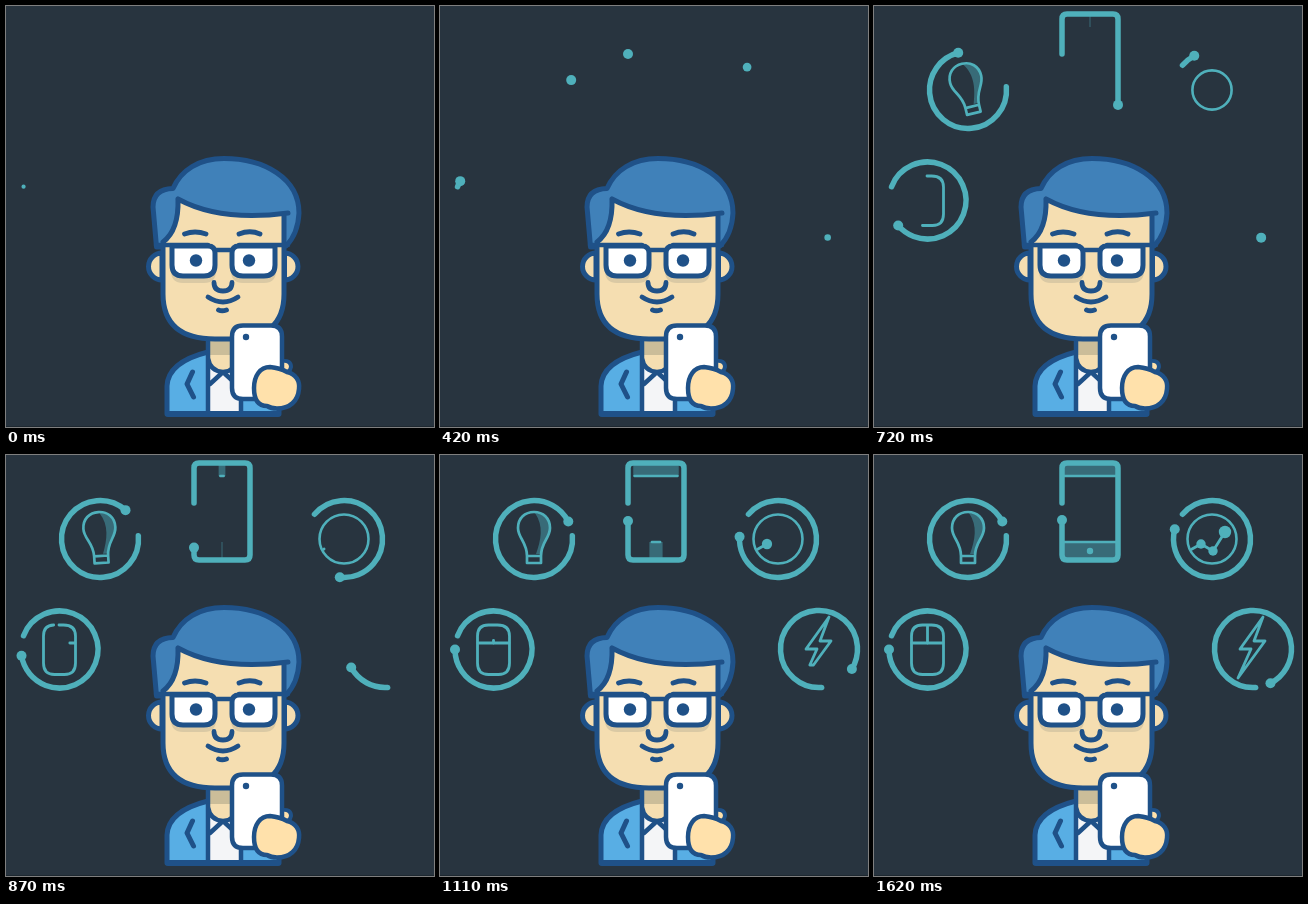
Recreate the animation shown at these times as an HTML page with a canvas. Size 428 px wide and 421 px high, loop 3.62 s.

```html
<!DOCTYPE html>
<html lang="en">
<head>
<meta charset="utf-8">
<title>Gadget icons</title>
<style>
html, body { margin: 0; width: 100%; height: 100%; overflow: hidden; background: #28343f; }
canvas { display: block; }
</style>
</head>
<body>
<canvas width="428" height="421"></canvas>
<script>
const LOOP = 3620, STEP = 30, LAST = 1620;
const TEAL = '#4fb0bb', SHADE = '#386b78', NAVY = '#1f5188', SKIN = '#f5deb1', HAIR = '#4081b9';
const c = document.querySelector('canvas').getContext('2d');
c.lineCap = c.lineJoin = 'round';

// Timing helpers
const part = (t, start, length) => Math.min(1, Math.max(0, (t - start) / length));
const quadOut = p => 1 - (1 - p) ** 2;
const cubicOut = p => 1 - (1 - p) ** 3;
const smooth = p => p * p * (3 - 2 * p);
const backOut = p => p && 1 + 2.7 * (p - 1) ** 3 + 1.7 * (p - 1) ** 2;

// Slow start, quick middle, long settle: cubic-bezier(.5, 0, 0, 1)
function sweep(p) {
  let lo = 0, hi = 1;
  for (let i = 0; i < 20; i++) {
    const s = (lo + hi) / 2;
    if (1.5 * s * (1 - s) ** 2 + s ** 3 < p) lo = s; else hi = s;
  }
  return 3 * lo * lo - 2 * lo ** 3;
}

// Drawing helpers
function shape(d, fill, stroke, width = 5) {
  const path = new Path2D(d);
  if (fill) { c.fillStyle = fill; c.fill(path); }
  if (stroke) { c.strokeStyle = stroke; c.lineWidth = width; c.stroke(path); }
}

function disc(x, y, r, color = TEAL) {
  if (r <= 0) return;
  c.fillStyle = color;
  c.beginPath();
  c.arc(x, y, r, 0, 7);
  c.fill();
}

function makePath(d) {
  const el = document.createElementNS('http://www.w3.org/2000/svg', 'path');
  el.setAttribute('d', d);
  return { d, el, length: el.getTotalLength() };
}

function trace(path, p, width) {
  if (p <= 0) return;
  c.setLineDash(p < 1 ? [path.length * p, path.length * 2] : []);
  shape(path.d, null, TEAL, width);
  c.setLineDash([]);
}

const dotSize = (t, start) => 5 * cubicOut(part(t, start, 300));

// Angles in degrees: dot travels from a to b, the line begins at s
function ring(t, x, y, [s, a, b], pop, start) {
  const rad = Math.PI / 180, r = 38.5;
  const angle = a + (b - a) * sweep(part(t, start, 720));
  if (angle > s) {
    c.beginPath();
    c.arc(x, y, r, s * rad, angle * rad);
    c.strokeStyle = TEAL;
    c.lineWidth = 5.5;
    c.stroke();
  }
  disc(x + r * Math.cos(angle * rad), y + r * Math.sin(angle * rad), dotSize(t, pop));
}

const mouseBody = makePath('M53 170H57.5Q69.5 170 69.5 181V208Q69.5 219.5 58.5 219.5H48.5Q37.5 219.5 37.5 208V181Q37.5 170 48.5 170Z');
const mouseSplit = makePath('M69 188H38');
const mouseButton = makePath('M53.5 188V171');
const phoneFrame = makePath('M188 48V13Q188 8 193 8H239Q244 8 244 13V100Q244 105 239 105H193Q188 105 188 100V65');
const graph = makePath('M318 94L327 89L339 96L351 77');
const bolt = [[389, 162], [366, 194], [377, 194], [364, 223], [391, 186], [380, 186]];

function mouse(t) {
  ring(t, 53.5, 194.5, [201, 201, 540], -50, 333);
  trace(mouseBody, smooth(part(t, 500, 420)), 2.8);
  trace(mouseSplit, smooth(part(t, 800, 270)), 2.8);
  trace(mouseButton, smooth(part(t, 1050, 240)), 2.8);
}

function bulb(t) {
  ring(t, 94, 84, [-5, -15, 333], 40, 409);
  const scale = cubicOut(part(t, 430, 340));
  if (!scale) return;
  c.save();
  c.translate(94, 83);
  c.rotate(-51 * (1 - quadOut(part(t, 430, 600))) * Math.PI / 180);
  c.scale(scale, scale);
  shape('M1 -25C10 -12 7 2 2 16H8C8 4 16 0 16 -10Q15 -24 1 -25Z', SHADE);
  shape('M-7 18C-7 4 -16 0 -16 -10C-16 -20 -9 -26 0 -26C9 -26 16 -20 16 -10C16 0 7 4 7 18ZM-7 18V25H7V18', null, TEAL, 2.7);
  c.restore();
}

function bar(t, start, length, top, height, edge) {
  if (t < start - 30) return;
  const p = part(t, start, length), w = Math.max(1, 54 * p ** 3), line = w * p;
  c.fillStyle = SHADE;
  c.fillRect(216 - w / 2, top, w, height);
  if (line > 1) shape(`M${216 - line / 2} ${edge}h${line}`, null, TEAL, 2.5);
}

function phone(t) {
  bar(t, 600, 540, 10, 11, 21);
  bar(t, 810, 480, 87, 16, 87);
  disc(216, 96, 3.2 * backOut(part(t, 1390, 200)));
  const p = sweep(part(t, 460, 720));
  trace(phoneFrame, p, 5.5);
  const dot = phoneFrame.el.getPointAtLength(phoneFrame.length * p);
  disc(dot.x, dot.y, dotSize(t, 130));
}

function chart(t) {
  ring(t, 338, 84, [220, 216.6, 554.7], 270, 590);
  const r = 24.5 * quadOut(part(t, 565, 280));
  if (r) {
    c.beginPath();
    c.arc(338, 84, r, 0, 7);
    c.strokeStyle = TEAL;
    c.lineWidth = Math.min(2.6, r);
    c.stroke();
  }
  trace(graph, smooth(part(t, 850, 750)), 2.8);
  [[327, 89, 4.7, 990], [339, 96, 4.7, 1210], [351, 77, 6.2, 1425]].forEach(
    ([x, y, size, start]) => disc(x, y, size * backOut(part(t, start, 190))));
}

function lightning(t) {
  ring(t, 379, 194, [86, 77, 423], 330, 692);
  const p = quadOut(part(t, 900, 390)), limit = 162 + 61 * p;
  if (!p) return;
  // Keep only what lies above the moving limit
  const points = [];
  bolt.forEach(([x, y], i) => {
    const [u, v] = bolt[(i + 1) % bolt.length];
    if (y <= limit) points.push([x, y]);
    if ((y <= limit) !== (v <= limit)) points.push([x + (u - x) * (limit - y) / (v - y), limit]);
  });
  shape('M' + points.join('L') + 'Z', null, TEAL, 2.8);
}

// Rounded lens, drawn from its outer top corner; side is 1 or -1
function lens(x, side) {
  const d = `h${36 * side}q${7 * side} 0 ${7 * side} 7v12q0 11 ${-11 * side} 11h${-21 * side}q${-11 * side} 0 ${-11 * side} -11z`;
  shape(`M${x} 246` + d, '#dac9a4');
  shape(`M${x} 246` + d, null, '#dac9a4', 2);
  shape(`M${x} 240` + d, '#fff', NAVY);
}

function person() {
  // Body
  shape('M161 408V380Q162 356 202 346H232Q272 354 273 380V408Z', '#58aee4', NAVY);
  shape('M202 334H234V408H202Z', '#f4f5f7');
  shape('M202 332H232V352Q230 365 217 366Q204 365 202 352Z', SKIN);
  shape('M202 332H232V349H202Z', '#cbbd99');
  shape('M202 334V408M235 350V408M202 352Q204 365 217 366Q230 365 232 352M204 378L217 366L230 378', null, NAVY, 4.5);
  shape('M186.5 366L181 378L187.5 391', null, NAVY);
  shape('M162 408H272', null, NAVY, 6);

  // Head
  shape('M156 247A13.5 13.5 0 0 0 156 274ZM278.5 247A13.5 13.5 0 0 1 278.5 274Z', SKIN, NAVY);
  shape('M150.5 241L147 201Q147 183 167 182.5C175 164 193 152.5 218 152.5C258 152.5 293 172 293 207Q292 228 280 240Z', HAIR, NAVY);
  shape('M157 238Q173 222 172 193Q213 212 277 209V288Q278 333 226 333H209Q157 333 157 288Z', SKIN);
  shape('M157 238V288Q157 333 209 333H226Q278 333 278 288V209M172 193Q214 216 282 207M172 193Q173 224 157 236', null, NAVY);

  // Face
  lens(166, 1);
  lens(269, -1);
  shape('M150 239H202M233 239H282M209 244H226', null, NAVY, 4.5);
  disc(190, 254.5, 6.2, NAVY);
  disc(243, 254.5, 6.2, NAVY);
  shape('M178.5 228Q189 224 200 228M233 228Q244 223.5 254 228M208 276.5Q208 285 217 285Q226 285 226 276.5M202 291Q217 301 232 291M212.5 304Q216 305.5 220.5 304', null, NAVY, 4.8);

  // Phone in hand
  shape('M276 355Q285 354 285 361Q284 367 276 367Z', '#ffe1ab', NAVY, 4);
  shape('M237 319.5H265Q276 319.5 276 330.5V382Q276 393 265 393H237Q226 393 226 382V330.5Q226 319.5 237 319.5Z', '#fff', NAVY, 4.5);
  disc(240, 331, 3.2, NAVY);
  shape('M248 382C248 370 254 361 264 361Q274 362 281 366C290 368 294 375 293 383C292 395 284 402.5 271 402.5Q265 402.5 261 400C252 400 248 393 248 382Z', '#ffe1ab', NAVY, 4.5);
}

function draw(now) {
  const t = Math.min(LAST, Math.floor(now % LOOP / STEP) * STEP);
  c.fillStyle = '#28343f';
  c.fillRect(0, 0, 428, 421);
  c.fillStyle = '#1e2830';
  c.fillRect(0, 420, 428, 1);
  person();
  [mouse, bulb, phone, chart, lightning].forEach(item => item(t));
}

const begin = performance.now();
function frame() {
  draw(performance.now() - begin);
  requestAnimationFrame(frame);
}
frame();
</script>
</body>
</html>
```
